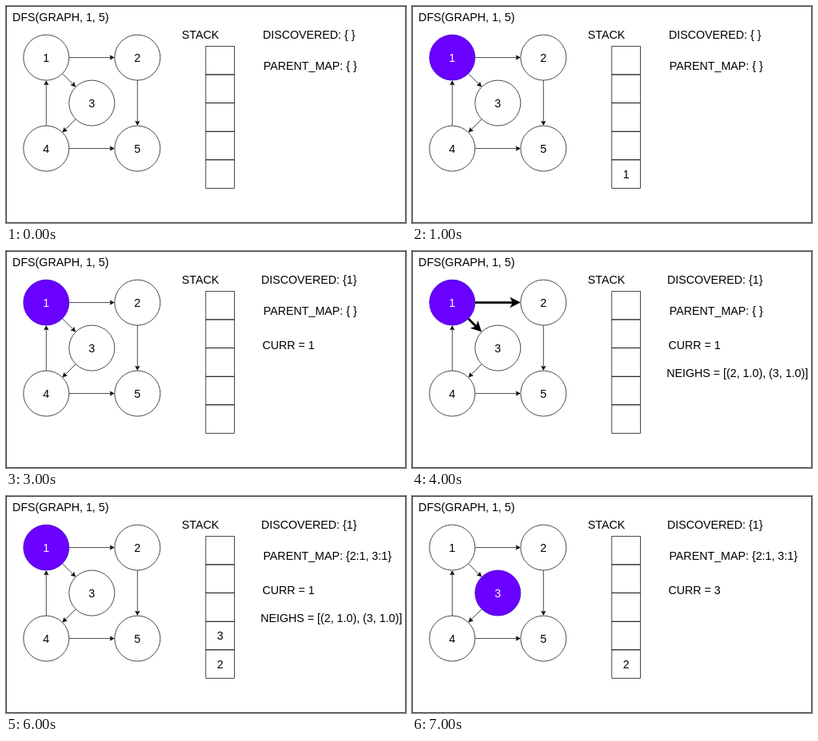
Write an HTML page that moves like this. It is 500x272 px and loops after 8 s.

```html
<!DOCTYPE html>
<html lang="en">
<meta charset="utf-8">
<title>Depth-first search</title>
<style>
  html, body { margin: 0; width: 100%; height: 100%; overflow: hidden; background: #fff; }
  svg { display: block; width: 500px; height: 272px; }
  text { font: 14.25px "Liberation Sans", Helvetica, Arial, sans-serif; text-anchor: middle; }
  .diagram text { font-size: 20px; }
</style>
<svg id="stage" viewBox="0 0 500 272"></svg>
<script>
const stage = document.getElementById('stage');
const LOOP = 8000, STEP = 1000, R = 40, CELL = 50;

// Node centres and edges, in diagram units
const nodes = { 1: [0, 0], 2: [160, 0], 3: [80, 80], 4: [0, 160], 5: [160, 160] };
const edges = [[1, 2], [1, 3], [3, 4], [4, 1], [4, 5], [2, 5]];

const start = { active: 0, stack: [], found: '{ }', parents: '{ }', parentsX: 380.3, curr: '', currY: 123.4, neighs: '', bold: false };
const changes = [
  {},
  { active: 1, stack: [1] },
  { stack: [], curr: 1, currY: 116 },
  { found: '{1}', currY: 123.4 },
  { neighs: '[(2, 1.0), (3, 1.0)]', bold: true },
  { bold: false, stack: [2], parents: '{2:1}', parentsX: 387.6 },
  { stack: [2, 3], parents: '{2:1, 3:1}', parentsX: 401.7 },
  { active: 3, stack: [2], curr: 3, neighs: '' },
];
const states = [];
changes.forEach((change, i) => states.push({ ...(states[i - 1] || start), ...change }));

const text = (x, y, value, fill = '#000') => `<text x="${x}" y="${y}" fill="${fill}">${value}</text>`;

function arrow([from, to], width) {
  const [x1, y1] = nodes[from], [x2, y2] = nodes[to];
  const length = Math.hypot(x2 - x1, y2 - y1);
  const angle = Math.atan2(y2 - y1, x2 - x1) * 180 / Math.PI;
  const size = 6 + width, tip = length - R - 1.118 * width;
  const notch = tip - size * 0.75, back = tip - size, half = size / 2;
  return `<g transform="translate(${x1} ${y1}) rotate(${angle})" stroke="#000" stroke-width="${width}">
    <path d="M${R} 0H${notch}"/>
    <path d="M${tip} 0L${back} ${half}L${notch} 0L${back} ${-half}Z"/></g>`;
}

function node(id, active) {
  const [x, y] = nodes[id];
  const [fill, stroke, ink] = active ? ['#6a00ff', '#3700cc', '#fff'] : ['#fff', '#000', '#000'];
  return `<circle cx="${x}" cy="${y}" r="${R}" fill="${fill}" stroke="${stroke}"/>` + text(x, y + 7, id, ink);
}

function stackCell(row, value = '') {
  const x = 280, y = 180 - row * CELL;
  return `<rect x="${x}" y="${y}" width="${CELL}" height="${CELL}" fill="none" stroke="#000"/>`
    + text(x + CELL / 2, y + 32, value);
}

function draw(s) {
  stage.innerHTML = `
    <rect x=".5" y=".5" width="499" height="271" fill="#fff" stroke="#000" stroke-width=".75"/>
    <g class="diagram" transform="translate(50.3 64.6) scale(.7125)">
      ${edges.map((edge, i) => arrow(edge, s.bold && i < 2 ? 4 : 1)).join('')}
      ${Object.keys(nodes).map(id => node(id, +id === s.active)).join('')}
      ${[0, 1, 2, 3, 4].map(row => stackCell(row, s.stack[row])).join('')}
    </g>`
    + text(68.3, 19, 'DFS(GRAPH, 1, 5)')
    + text(243, 41, 'STACK')
    + text(378.7, 41, 'DISCOVERED: ' + s.found)
    + text(s.parentsX, 80.2, 'PARENT_MAP: ' + s.parents)
    + (s.curr && text(353.1, s.currY, 'CURR = ' + s.curr))
    + (s.neighs && text(406.7, 158, 'NEIGHS = ' + s.neighs));
}

let shown = -1;
function tick() {
  const step = Math.floor(performance.now() % LOOP / STEP);
  if (step !== shown) draw(states[shown = step]);
  requestAnimationFrame(tick);
}
tick();
</script>
</html>
```
